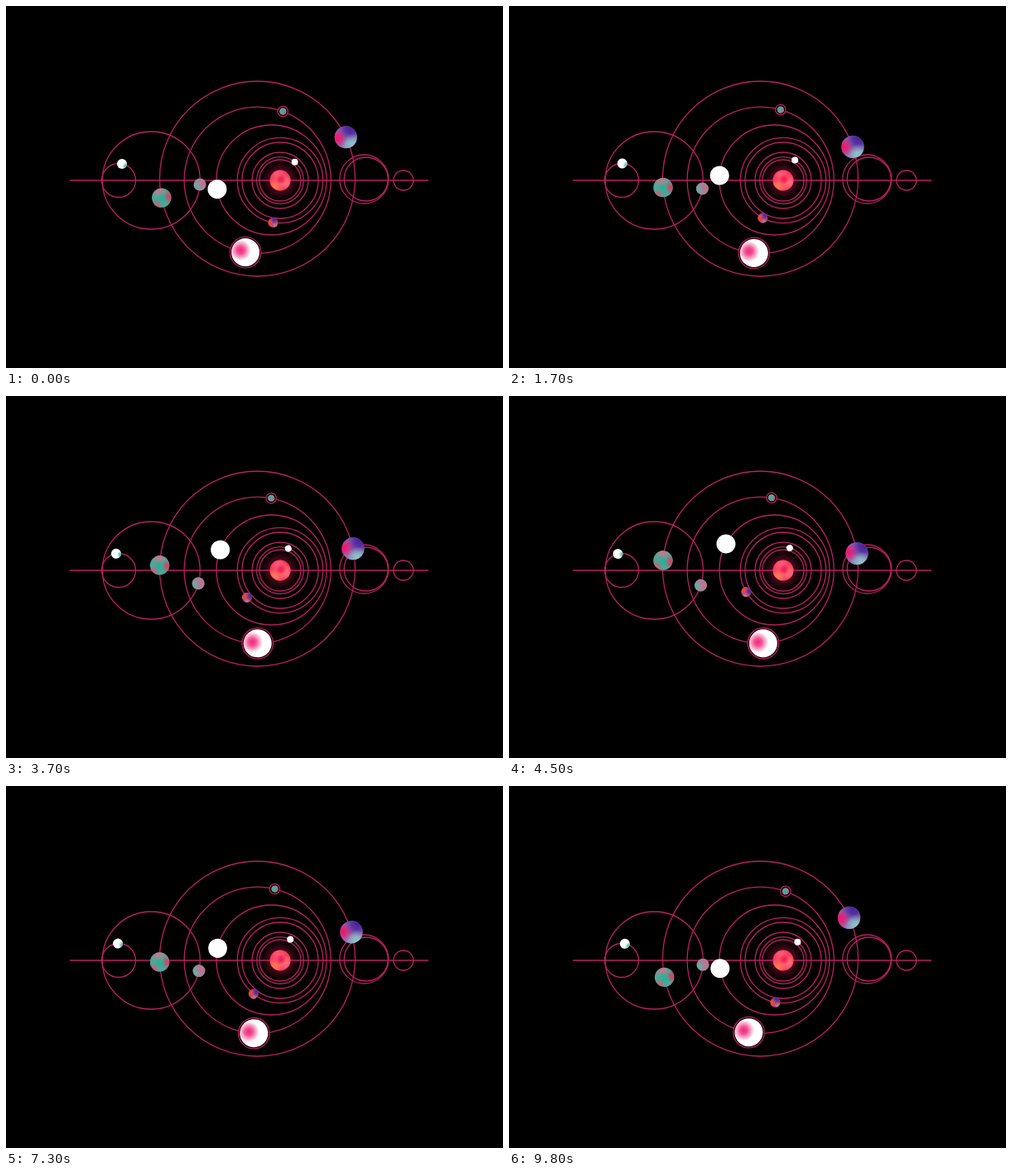
An HTML page with a canvas that plays this animation: 600x438 px, repeating every 9.9 s.

```html
<!DOCTYPE html>
<html lang="en">
<head>
<meta charset="utf-8">
<title>Orbits</title>
<style>
  html, body { margin: 0; height: 100%; overflow: hidden; background: #000; }
  canvas { display: block; }
</style>
</head>
<body>
<canvas width="600" height="438"></canvas>
<script>
const ctx = document.querySelector('canvas').getContext('2d');
const LOOP = 9900, STEP = 100;
const LINE = '#b9215c';

// cx, cy, radius
const rings = [
  [303.5, 209, 118], [303.7, 210.7, 88.6], [320.5, 210.5, 66.5],
  [331, 211, 51.7], [331, 211, 46], [331, 211, 34], [331, 211, 28.3], [331, 211, 25],
  [175.3, 211, 59], [136, 211, 20.5],
  [432.3, 209.5, 29.5], [434.7, 209.5, 26.5], [479.8, 211, 12]
];

// angles in degrees, speed in degrees per second;
// spots are soft blobs [x, y, radius, colour] in units of the planet radius
const planets = [
  { ring: 0, start: -25.2, speed: 3.6, r: 13.6, base: '#8c78b4', spots: [
    [0.4, -0.8, 1.3, '#4b1f9c'], [0.6, 0.7, 1, '#8fc4c8'], [-0.8, 0.1, 0.9, '#f0146e']] },
  { ring: 0, start: 168.7, speed: 3.6, r: 11.7, base: '#4aa898', spots: [
    [-0.3, -0.9, 0.9, '#c8788c'], [0.8, -0.1, 0.7, '#d04668'],
    [-0.5, 0.8, 0.7, '#c46478'], [0, 0.1, 0.6, '#28b096']] },
  { ring: 1, start: 99.5, speed: -2.57, r: 17, halo: 18.7, base: '#fff', spots: [
    [-0.35, -0.15, 0.75, '#f0287a']] },
  { ring: 1, start: -69.8, speed: -2.57, r: 4.2, halo: 6.2, base: '#6f9c98', spots: [
    [0.6, 0.4, 0.8, '#b06a84'], [-0.3, -0.2, 0.7, '#46a898']] },
  { ring: 2, start: 170.3, speed: 8.45, r: 11.5, base: '#fff', spots: [] },
  { ring: 3, start: 99.5, speed: 11.15, r: 6, base: '#b84a6c', spots: [
    [0.3, -0.7, 1, '#4a2aa0'], [-0.7, 0.1, 0.8, '#f04632'], [0.5, 0.7, 0.7, '#b87896']] },
  { ring: 6, start: -51.5, speed: -4.95, r: 4, base: '#fff', spots: [] },
  { ring: 8, start: 4.8, speed: 2.9, r: 7.5, base: '#a0869a', spots: [
    [-0.6, 0.3, 0.9, '#6fa89f'], [0.5, -0.2, 0.8, '#c4708e']] },
  { ring: 9, start: -78.7, speed: -5.35, r: 6, base: '#fff', spots: [
    [0.8, 0.5, 0.8, '#50bcae']] }
];

const sun = { r: 12.5, base: '#f8385c', spots: [
  [-0.5, 0.6, 0.8, '#ff7a5a'], [0.5, 0.2, 0.8, '#ff6e78'],
  [-0.2, -0.6, 0.8, '#fa5a78'], [0.1, -0.1, 0.5, '#f01e50']] };

function circle(x, y, r) {
  ctx.beginPath();
  ctx.arc(x, y, r, 0, Math.PI * 2);
}

function glow(x, y, r, color) {
  const g = ctx.createRadialGradient(x, y, 0, x, y, r);
  g.addColorStop(0, color);
  g.addColorStop(0.35, color + 'd0');
  g.addColorStop(1, color + '00');
  ctx.fillStyle = g;
  ctx.fill();
}

function drawBall({ r, halo, base, spots }, x, y, turn) {
  ctx.save();
  ctx.translate(x, y);
  ctx.rotate(turn);
  if (halo) {
    circle(0, 0, halo);
    ctx.fillStyle = '#000';
    ctx.fill();
    ctx.stroke();
  }
  circle(0, 0, r);
  ctx.fillStyle = base;
  ctx.fill();
  for (const [sx, sy, size, color] of spots) glow(sx * r, sy * r, size * r, color);
  ctx.restore();
}

function draw(time) {
  const t = Math.floor(time % LOOP / STEP) * STEP;
  const seconds = Math.min(t, LOOP - t) / 1000;

  ctx.fillStyle = '#000';
  ctx.fillRect(0, 0, 600, 438);
  ctx.strokeStyle = LINE;
  ctx.lineWidth = 1.3;

  circle(331, 211, 24);
  glow(331, 211, 24, '#78102a');
  for (const ring of rings) {
    circle(...ring);
    ctx.stroke();
  }
  ctx.beginPath();
  ctx.moveTo(77, 211);
  ctx.lineTo(510, 211);
  ctx.stroke();

  drawBall(sun, 331, 211, 0);
  for (const p of planets) {
    const [cx, cy, radius] = rings[p.ring];
    const turn = p.speed * seconds * Math.PI / 180;
    const angle = p.start * Math.PI / 180 + turn;
    drawBall(p, cx + radius * Math.cos(angle), cy + radius * Math.sin(angle), turn);
  }
}

const begin = performance.now();
function tick() {
  draw(performance.now() - begin);
  requestAnimationFrame(tick);
}
tick();
</script>
</body>
</html>
```
